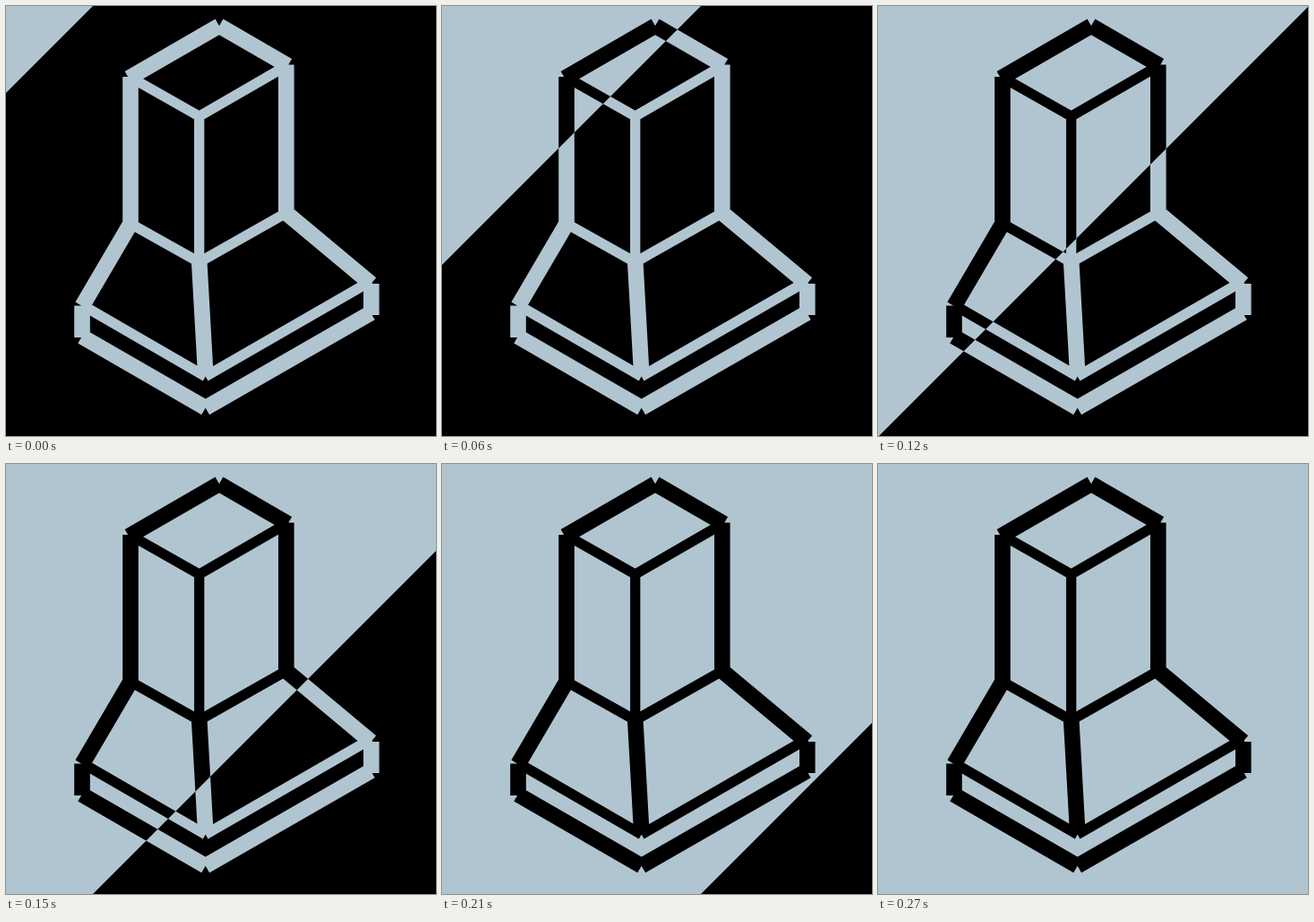
Animation, 480 px wide and 480 px high, one loop 0.3 s. Source, as an HTML page with a canvas:

```html
<!DOCTYPE html>
<html lang="en">
<head>
<meta charset="utf-8">
<title>Cooker hood wipe</title>
<style>
  html, body { margin: 0; height: 100%; overflow: hidden; background: #000; }
  canvas { display: block; }
</style>
</head>
<body>
<canvas id="stage" width="480" height="480"></canvas>
<script>
const SIZE = 480, STEP_MS = 30, STEPS = 10;
const LIGHT = '#b1c5d0', DARK = '#000';
const ctx = document.getElementById('stage').getContext('2d');

// Every edge is its own butt-capped stroke, which leaves the small notches at the corners.
const thick = new Path2D(`
  M137 80.5L238 22.2 M238 22.2L314.7 66.5
  M139 79V243 M312.8 65.5V231
  M139 243L85 335 M312.8 231L407.5 310 M215.7 285L222.7 410
  M85 334.5V370 M407.8 310V345
  M84.7 369L222.7 448.7 M222.7 448.7L407.3 342.7`);
const thin = new Path2D(`
  M139 79.7L215.7 123.2 M215.7 123.2L314.5 66 M215.7 123V286
  M139 243L215.7 286 M215.7 286L312.8 231
  M87 335L222.7 413.5 M222.7 413.5L407.5 307`);

function drawHood(background, ink) {
  ctx.fillStyle = background;
  ctx.fillRect(0, 0, SIZE, SIZE);
  ctx.strokeStyle = ink;
  ctx.lineWidth = 17.6;
  ctx.stroke(thick);
  ctx.lineWidth = 11.3;
  ctx.stroke(thin);
}

function draw(now) {
  const step = Math.floor(now / STEP_MS) % STEPS;
  const reach = (step + 1) * 2 * SIZE / STEPS + 1;
  drawHood(DARK, LIGHT);
  ctx.save();
  ctx.beginPath();
  ctx.moveTo(0, 0);
  ctx.lineTo(reach, 0);
  ctx.lineTo(0, reach);
  ctx.clip();
  drawHood(LIGHT, DARK);
  ctx.restore();
}

const start = performance.now();
function tick() {
  draw(performance.now() - start);
  requestAnimationFrame(tick);
}
tick();
</script>
</body>
</html>
```
